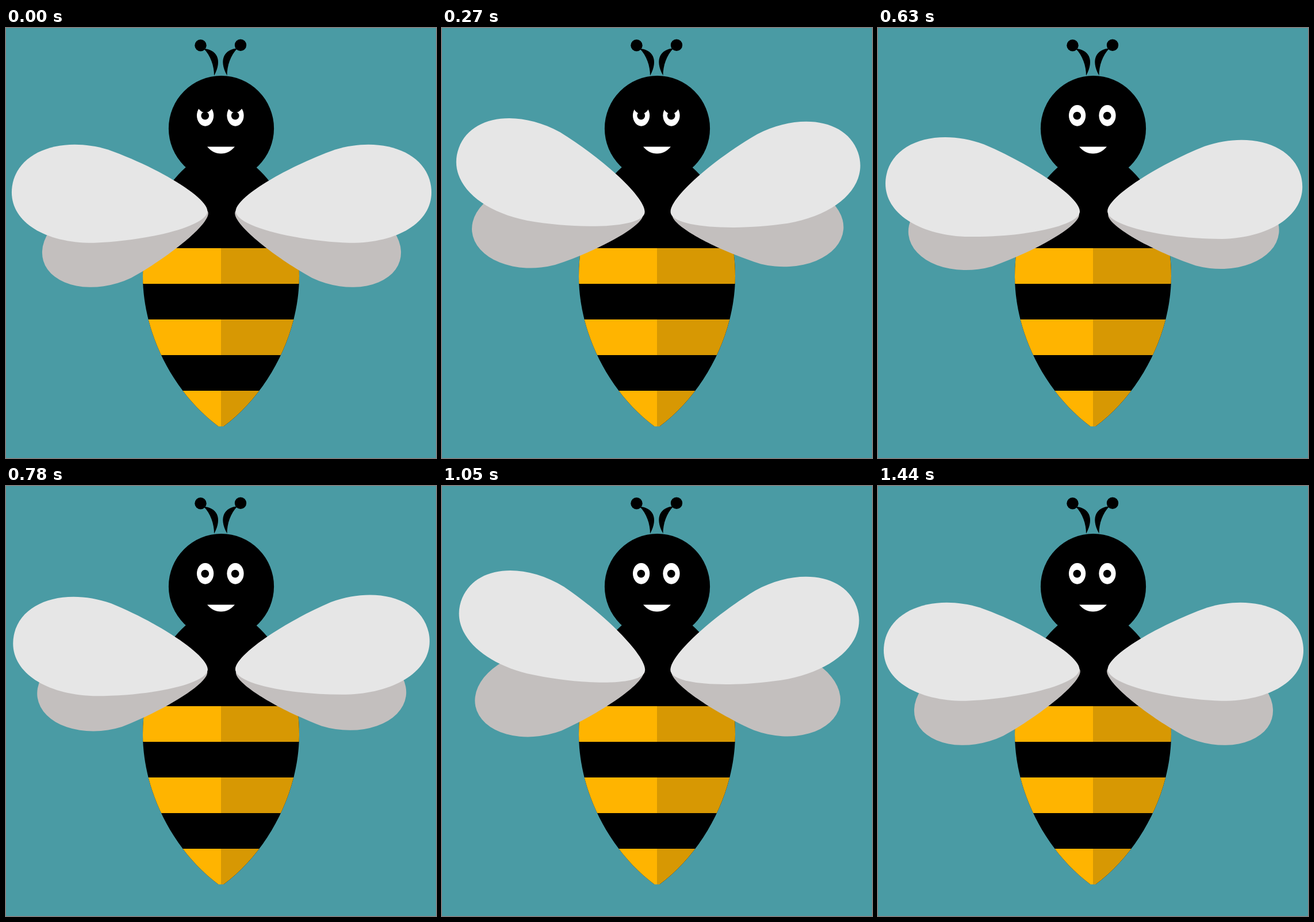
Recreate the animation shown at these times as an HTML page. Size 748 px wide and 748 px high, loop 2.11 s.

```html
<!DOCTYPE html>
<html lang="en">
<head>
<meta charset="utf-8">
<title>Bee</title>
<style>
html, body { margin: 0; width: 100%; height: 100%; overflow: hidden; background: #4a9ba4; }
svg { display: block; width: 100vw; height: 100vh; }
</style>
</head>
<body>
<svg viewBox="0 0 748 748">
  <defs>
    <path id="torso" d="M238 432C238 345 271 279 313 242H435C477 279 510 345 510 432C510 530 458 634 378.500 693H369.500C290 634 238 530 238 432Z"/>
    <clipPath id="inside"><use href="#torso"/></clipPath>
    <path id="upper" fill="#e6e6e6" transform="translate(350.300 320) rotate(8.400)"
      d="M0 0C0 -24 -96 -64 -187 -82C-270 -94 -342.500 -56 -342.500 5C-342.500 64 -276 96 -187 82C-96 65 0 26 0 0Z"/>
    <path id="lower" fill="#c3bfbe" transform="translate(351.500 320) rotate(-16.500)"
      d="M0 0C0 -20 -84 -55 -161 -72A112 74 0 1 0 -161 72C-84 55 0 20 0 0Z"/>
    <g id="antenna">
      <circle cx="338.500" cy="30.300" r="10.200"/>
      <path d="M344 36C365 37 378 54 362 83C362 66 356 48 344 36Z"/>
    </g>
  </defs>

  <rect width="748" height="748" fill="#4a9ba4"/>
  <use href="#antenna"/>
  <use href="#antenna" transform="translate(746.500 -.6) scale(-1 1)"/>
  <use href="#torso"/>
  <g clip-path="url(#inside)">
    <path fill="#ffb400" d="M230 383h144v62h-144zM230 507h144v62h-144zM230 631h144v62h-144z"/>
    <path fill="#d79803" d="M374 383h144v62h-144zM374 507h144v62h-144zM374 631h144v62h-144z"/>
  </g>
  <circle cx="374.500" cy="174.700" r="91.600"/>
  <g fill="#fff">
    <ellipse cx="346.600" cy="152.300" rx="14.600" ry="18.400"/>
    <ellipse cx="399" cy="152.300" rx="14.600" ry="18.400"/>
    <path d="M350 206.500H398C391 214.500 384 218.500 374 218.500S357 214.500 350 206.500Z"/>
  </g>
  <circle cx="346.300" cy="152.700" r="6.900"/>
  <circle cx="398.700" cy="152.700" r="6.900"/>
  <g id="lids">
    <ellipse cx="346.600" cy="152.300" rx="15" ry="18.800"/>
    <ellipse cx="398.600" cy="152.300" rx="15" ry="18.800"/>
  </g>
  <g id="left">
    <g class="low"><use href="#lower"/></g>
    <g class="up"><use href="#upper"/></g>
  </g>
  <g id="right" transform="translate(750 0) scale(-1 1)">
    <g class="low"><use href="#lower"/></g>
    <g class="up"><use href="#upper"/></g>
  </g>
</svg>
<script>
const LOOP = 2110, STEP = 30, END = 1440;
const $ = s => document.querySelector(s);

// [time, value] keys, linear in between
const tracks = {
  leftUp: [[0, 0], [330, 14.7], [720, 0], [1050, 14.7], [1440, 0]],
  rightUp: [[0, 0], [330, 12.9], [690, 0], [1020, 12.9], [1380, 0]],
  leftLow: [[0, 0], [330, 13.1], [1440, 0]],
  rightLow: [[0, 0], [330, 14], [1440, 0]],
  lids: [[0, -24], [150, 0], [360, -38]]
};

function at(keys, t) {
  for (let i = 1; i < keys.length; i++) {
    const [t0, a] = keys[i - 1], [t1, b] = keys[i];
    if (t <= t1) return a + (b - a) * (t - t0) / (t1 - t0);
  }
  return keys[keys.length - 1][1];
}

const wings = ["left", "right"].flatMap(side => [
  [$(`#${side} .up`), tracks[side + "Up"], "335 330"],
  [$(`#${side} .low`), tracks[side + "Low"], "328 312"]
]);
const lids = $("#lids");

function draw(now) {
  const t = Math.min(Math.floor(now % LOOP / STEP) * STEP, END);
  for (const [el, keys, pivot] of wings)
    el.setAttribute("transform", `rotate(${at(keys, t)} ${pivot})`);
  lids.setAttribute("transform", `translate(0 ${at(tracks.lids, t)})`);
}

let start;
function tick(now) {
  start ??= now;
  draw(now - start);
  requestAnimationFrame(tick);
}
draw(0);
requestAnimationFrame(tick);
</script>
</body>
</html>
```
